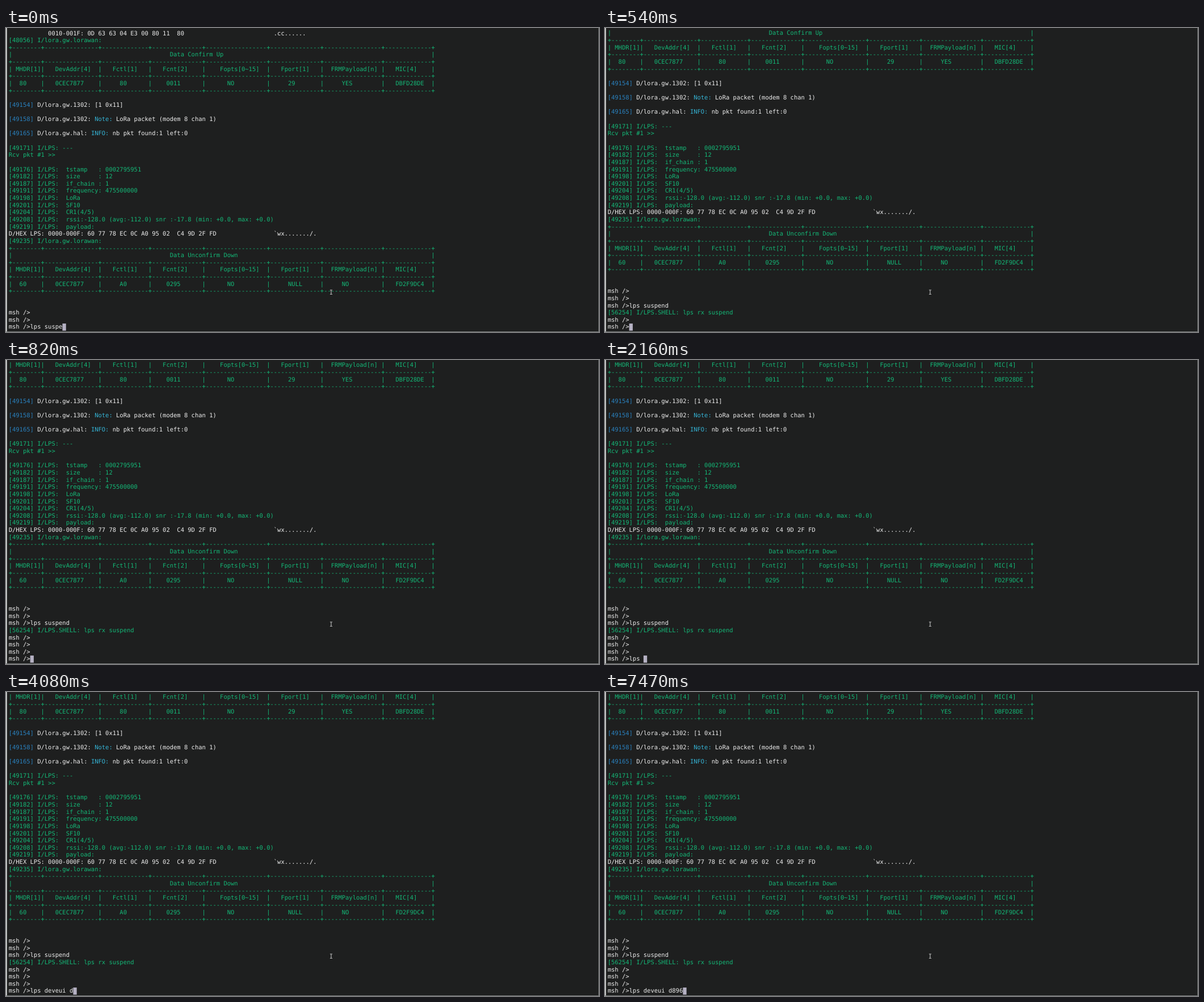
Write an HTML page that moves like this. It is 1045 px wide and 536 px high and loops after 8000 ms.

```html
<!DOCTYPE html>
<html lang="en">
<head>
<meta charset="utf-8">
<title>Gateway shell</title>
<style>
  html, body { margin: 0; width: 100%; height: 100%; overflow: hidden; background: #1e1f1f; }
  svg { display: block; width: 100%; height: 100%; }
  text {
    font: 10.49px "DejaVu Sans Mono", "Liberation Mono", monospace;
    white-space: pre;
    font-kerning: none;
    font-variant-ligatures: none;
    text-rendering: geometricPrecision;
  }
</style>
</head>
<body>
<svg viewBox="0 0 1045 536" preserveAspectRatio="none">
  <rect width="1045" height="536" fill="#1e1f1f"/>
  <g id="log"></g>
  <rect id="caret" width="6.3" height="12.6" fill="#b5b1c3"/>
  <path d="M571 462H572.4L573 462.5L573.6 462H575M573 462.5V469M571 469.5H572.4L573 469L573.6 469.5H575"
        fill="none" stroke="#e6e6e6" stroke-width="0.9"/>
  <rect width="1.6" height="536" fill="#e4e6e6"/>
  <rect x="1044" width="1" height="536" fill="#7c7f7f"/>
  <rect y="535" width="1045" height="1" fill="#7c7f7f"/>
</svg>
<script>
const LOOP = 8000;
const CW = 6.316, LH = 12.634, LEFT = 4.7, TOP = 3.1, ASCENT = 9.4;
const LAST = 41; // bottom row of the screen
const COLORS = { g: '#14b877', w: '#eeeeee', b: '#2a82c0', c: '#35b4d6' };
const PROMPT = 'msh />';

// Table layout: separator columns, then text columns
const BARS = [0, 9, 25, 39, 54, 72, 87, 104, 118];
const HEAD_COLS = [2, 13, 29, 43, 59, 76, 90, 108];
const DATA_COLS = [3, 13, 31, 44, 61, 78, 93, 108];
const HEAD = ['MHDR[1]', 'DevAddr[4]', 'Fctl[1]', 'Fcnt[2]', 'Fopts[0~15]', 'Fport[1]', 'FRMPayload[n]', 'MIC[4]'];

const green = s => [['g', s]];
const white = s => [['w', s]];
const info = (stamp, s) => green(`[${stamp}] I/${s}`);
const lps = (stamp, s) => info(stamp, 'LPS:  ' + s);
const debug = (stamp, ...parts) => [['b', `[${stamp}]`], ...parts];
const hex = (label, bytes, ascii) => white((label.padEnd(11) + bytes).padEnd(74) + ascii);
const blank = [];

function place(cols, words, bars) {
  const line = Array(119).fill(' ');
  bars.forEach(c => line[c] = '|');
  words.forEach((w, i) => [...w].forEach((ch, k) => line[cols[i] + k] = ch));
  return green(line.join(''));
}

function table(title, data) {
  const rule = green(Array.from({ length: 119 }, (_, i) => BARS.includes(i) ? '+' : '-').join(''));
  return [
    rule, place([45], [title], [0, 118]),
    rule, place(HEAD_COLS, HEAD, BARS),
    rule, place(DATA_COLS, data, BARS), rule
  ];
}

const lines = [
  hex('', '0010-001F: 0D 63 63 04 E3 00 80 11  80', '.cc......'),
  info(48056, 'lora.gw.lorawan:'),
  ...table('Data Confirm Up', ['80', '0CEC7877', '80', '0011', 'NO', '29', 'YES', 'DBFD28DE']),
  blank,
  debug(49154, ['w', ' D/lora.gw.1302: [1 0x11]']),
  blank,
  debug(49158, ['w', ' D/lora.gw.1302: '], ['c', 'Note:'], ['w', ' LoRa packet (modem 8 chan 1)']),
  blank,
  debug(49165, ['w', ' D/lora.gw.hal: '], ['c', 'INFO:'], ['w', ' nb pkt found:1 left:0']),
  blank,
  info(49171, 'LPS: ---'),
  green('Rcv pkt #1 >>'),
  blank,
  lps(49176, 'tstamp   : 0002795951'),
  lps(49182, 'size     : 12'),
  lps(49187, 'if_chain : 1'),
  lps(49191, 'frequency: 475500000'),
  lps(49198, 'LoRa'),
  lps(49201, 'SF10'),
  lps(49204, 'CR1(4/5)'),
  lps(49208, 'rssi:-128.0 (avg:-112.0) snr :-17.8 (min: +0.0, max: +0.0)'),
  lps(49219, 'payload:'),
  hex('D/HEX LPS:', '0000-000F: 60 77 78 EC 0C A0 95 02  C4 9D 2F FD', '`wx......./.'),
  info(49235, 'lora.gw.lorawan:'),
  ...table('Data Unconfirm Down', ['60', '0CEC7877', 'A0', '0295', 'NO', 'NULL', 'NO', 'FD2F9DC4']),
  blank,
  blank,
  white(PROMPT),
  white(PROMPT),
  white(PROMPT + 'lps suspend'),
  info(56254, 'LPS.SHELL: lps rx suspend'),
  ...Array.from({ length: 4 }, () => white(PROMPT))
];

// [time, rows scrolled, typed command]
const steps = [
  [0, 0, 'lps suspe'], [150, 0, 'lps suspen'], [270, 0, 'lps suspend'],
  [390, 2, ''], [540, 3, ''], [670, 4, ''], [820, 5, '']
];
const command = 'lps deveui d896';
const keys = [
  [1430, 1], [1560, 2], [1710, 3], [2160, 4], [2730, 5], [2880, 6], [3030, 8],
  [3310, 9], [3470, 10], [3620, 11], [4080, 12], [5700, 13], [7000, 14], [7470, 15]
];
keys.forEach(([time, n]) => steps.push([time, 5, command.slice(0, n)]));

const NS = 'http://www.w3.org/2000/svg';
const log = document.getElementById('log');
const caret = document.getElementById('caret');

function add(parent, tag, attrs, text = '') {
  const el = document.createElementNS(NS, tag);
  for (const key in attrs) el.setAttribute(key, attrs[key]);
  el.textContent = text;
  return parent.appendChild(el);
}

const rows = lines.map((parts, i) => {
  const row = add(log, 'text', { x: LEFT, y: TOP + ASCENT + i * LH });
  parts.forEach(([color, text]) => add(row, 'tspan', { fill: COLORS[color] }, text));
  return row;
});

function render(t) {
  const [, scroll, typed] = steps.filter(step => step[0] <= t).pop();
  const active = LAST + scroll;
  rows.forEach((row, i) => {
    const shown = i >= scroll && i <= active;
    row.setAttribute('visibility', shown ? 'visible' : 'hidden');
    if (i >= LAST) {
      row.firstChild.textContent = i === active ? PROMPT + typed : lines[i][0][1];
    }
  });
  log.setAttribute('transform', `translate(0 ${-scroll * LH})`);
  caret.setAttribute('x', LEFT + (PROMPT.length + typed.length) * CW);
  caret.setAttribute('y', TOP + LAST * LH);
}

const start = performance.now();
function tick() {
  render((performance.now() - start) % LOOP);
  requestAnimationFrame(tick);
}
tick();
</script>
</body>
</html>
```
